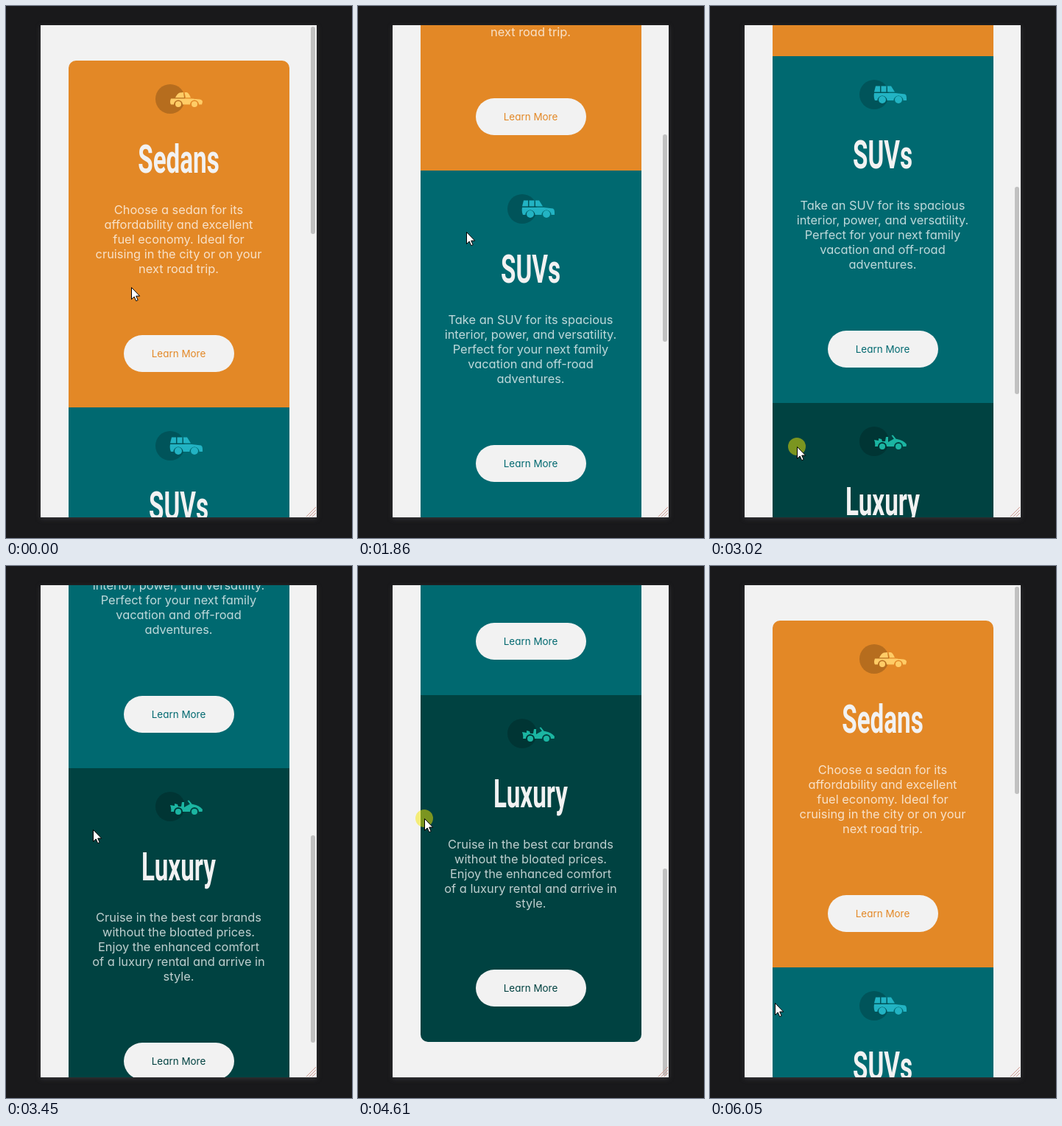
An HTML page that plays this animation: 470x721 px, repeating every 6610 ms.

```html
<!DOCTYPE html>
<html lang="en">
<head>
<meta charset="utf-8">
<title>Car cards</title>
<style>
  html, body { margin: 0; width: 100%; height: 100%; overflow: hidden; background: #19191b; }
  svg { display: block; width: 100vw; height: 100vh; }
  text { text-anchor: middle; font-family: Inter, sans-serif; font-feature-settings: "cv11"; }
  .title { font: 700 54px Roboto, sans-serif; fill: #f2f2f2; }
  .copy { font-size: 16.4px; fill: #fff; fill-opacity: .75; }
  .label { font-size: 13.45px; }
  .page { filter: drop-shadow(0 2px 3px #343437); }
</style>
</head>
<body>
<svg viewBox="0 0 470 721">
  <defs>
    <clipPath id="view"><rect x="47" y="26" width="375" height="667"/></clipPath>
    <clipPath id="rounded"><rect x="85" y="74" width="300" height="1410" rx="10"/></clipPath>
  </defs>
  <rect class="page" x="47" y="26" width="375" height="667" fill="#f2f2f2"/>
  <g clip-path="url(#view)">
    <g id="content"><g id="cards" clip-path="url(#rounded)"></g></g>
    <rect id="thumb" x="414" y="28" width="6" height="281" rx="3" fill="#c1c1c1"/>
    <path d="M408 692l13-13M412 692l9-9M416 692l5-5" stroke="#cf9a90" fill="none"/>
  </g>
  <g id="pointer">
    <circle id="press" r="12" fill="#f5e800" fill-opacity=".5"/>
    <path d="M.5 .5V16.5l3.7-3.5 2.5 5.7 2.5-1.1-2.5-5.5h5z" fill="#fff" stroke="#000" stroke-linejoin="round"/>
  </g>
</svg>
<script>
const LOOP = 6610, TICK = 144, LAST_TICK = 42;
const CARD_HEIGHT = 470, THUMB_RATIO = 0.4553;

const cards = [
  {
    title: 'Sedans', color: '#e38826', tint: '#ffcc66', wheel: 4,
    lines: ['Choose a sedan for its', 'affordability and excellent', 'fuel economy. Ideal for',
      'cruising in the city or on your', 'next road trip.'],
    car: 'M27 18.2q3-6 6-6.7l5-.5 1 7.2zM39.5 11h3q3 1 5.500 7.200h-7z' +
      'M21 19.500h28l11 1q4 .8 4 3.500l-1 3.500h-4a6 6 0 0 0-12 0h-10a6 6 0 0 0-12 0h-4q-2-3 0-8z'
  },
  {
    title: 'SUVs', color: '#006970', tint: '#22b3c3', wheel: 5,
    lines: ['Take an SUV for its spacious', 'interior, power, and versatility.',
      'Perfect for your next family', 'vacation and off-road', 'adventures.'],
    car: 'M20 16.5l2-8h6v8zM29.5 8.5h7v8h-7zM38 8.5h5l5 8h-10z' +
      'M20 18h29l13 1.5q2 1 2 4.5v4h-4.5a6.5 6.5 0 0 0-13 0h-9a6.5 6.5 0 0 0-13 0h-3.5q-2-4-1-10z'
  },
  {
    title: 'Luxury', color: '#004241', tint: '#1bb5a2', wheel: 4,
    lines: ['Cruise in the best car brands', 'without the bloated prices.',
      'Enjoy the enhanced comfort', 'of a luxury rental and arrive in', 'style.'],
    car: 'M43.5 12l2-.5 4 5-2 1z' +
      'M20 18l6 1v-3l4 1 1 3h4l1-6h3v7l8-4.5q12 1 17 7.5l-.5 3h-4.5a6 6 0 0 0-12 0h-10a6 6 0 0 0-12 0h-4q1-4-1-9z'
  }
];

const cardMarkup = ({ title, color, tint, wheel, lines, car }, i) => `
  <g transform="translate(85 ${74 + i * CARD_HEIGHT})">
    <rect width="300" height="${CARD_HEIGHT}" fill="${color}"/>
    <g transform="translate(118 32)" fill="${tint}">
      <circle cx="20" cy="20" r="20" fill="#000" fill-opacity=".2"/>
      <path d="${car}"/>
      <circle cx="31" cy="27" r="${wheel}"/><circle cx="53" cy="27" r="${wheel}"/>
    </g>
    <text class="title" transform="translate(149.5 152) scale(.615 1)">${title}</text>
    ${lines.map((line, n) => `<text class="copy" x="149.5" y="${208 + n * 20}">${line}</text>`).join('')}
    <rect x="75" y="372" width="150" height="50" rx="25" fill="#f2f2f2"/>
    <text class="label" x="149.5" y="402" fill="${color}">Learn More</text>
  </g>`;

const $ = id => document.getElementById(id);
$('cards').innerHTML = cards.map(cardMarkup).join('');

// Tracks: [tick, ...values], linear in between.
const pointerTrack = [
  [0, 170, 381], [5, 123, 486], [8, 123, 486], [9, 122, 471], [12, 147, 306], [14, 147, 306],
  [19, 118, 612], [20, 118, 612], [21, 118, 597], [24, 118, 357], [27, 118, 357], [30, 89, 335],
  [33, 90, 345], [34, 105, 400], [36, 165, 633], [38, 148, 616], [41, 140, 612], [42, 88, 592]
];
const scrollTrack = [
  [0, 0], [8, 0], [9, 4], [10, 55], [12, 225], [13, 321], [14, 388], [16, 452], [18, 470], [20, 472],
  [21, 476], [22, 533], [23, 645], [24, 740], [25, 800], [26, 830], [27, 839], [32, 839], [33, 830],
  [34, 790], [35, 680], [36, 485], [37, 220], [38, 0], [42, 0]
];
const presses = [[7, 11], [20, 23], [30, 35]];

function sample(track, tick) {
  const next = Math.max(1, track.findIndex(key => key[0] >= tick));
  const [from, ...a] = track[next - 1], [to, ...b] = track[next];
  return a.map((v, i) => Math.round(v + (b[i] - v) * (tick - from) / (to - from)));
}

function draw(now) {
  const tick = Math.min(LAST_TICK, Math.floor((now % LOOP + 14) / TICK));
  const [x, y] = sample(pointerTrack, tick);
  const [scroll] = sample(scrollTrack, tick);
  const pressed = presses.some(([start, end]) => tick >= start && tick <= end);
  $('content').setAttribute('transform', `translate(0 ${-scroll})`);
  $('thumb').setAttribute('y', 28 + Math.round(scroll * THUMB_RATIO));
  $('pointer').setAttribute('transform', `translate(${x} ${y})`);
  $('press').setAttribute('visibility', pressed ? 'visible' : 'hidden');
  requestAnimationFrame(draw);
}
draw(0);
</script>
</body>
</html>
```
